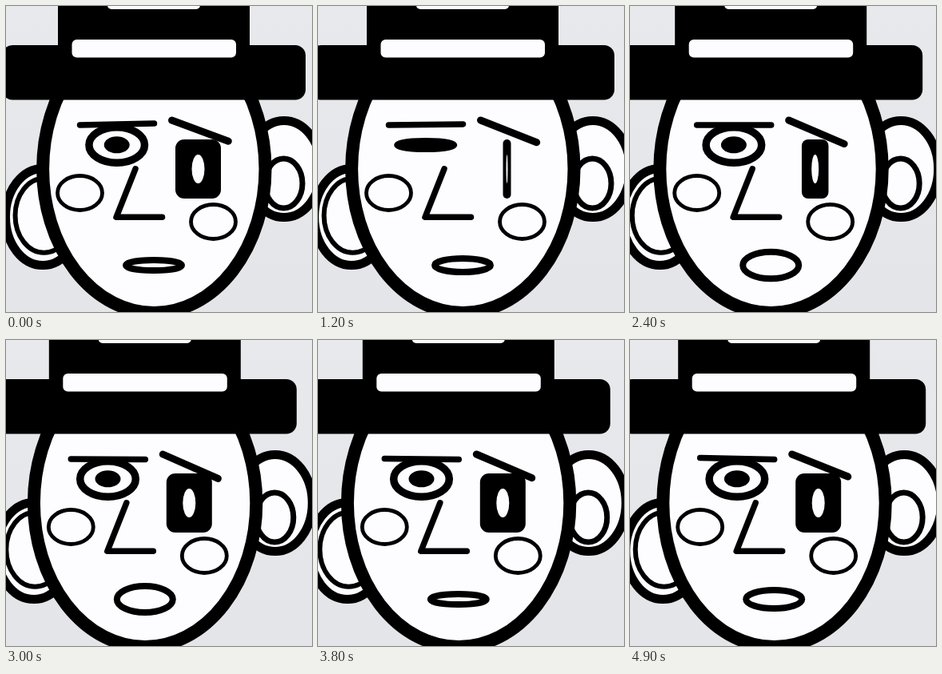
An HTML page that plays this animation: 383x383 px, repeating every 5 s.

```html
<!DOCTYPE html>
<html lang="en">
<head>
<meta charset="utf-8">
<title>Face with hat</title>
<style>
html, body { margin: 0; width: 100%; height: 100%; overflow: hidden; }
body { background: linear-gradient(#e8e9ec, #e4e5e9); }
svg { display: block; width: 100%; height: 100%; }
.line { fill: #fdfcff; stroke: #000; stroke-linecap: round; stroke-linejoin: round; }
.white { fill: #fdfcff; }
</style>
</head>
<body>
<svg viewBox="0 0 383 383">
  <g id="face">
    <g class="line">
      <ellipse cx="46" cy="264" rx="46.5" ry="60.5" stroke-width="11"/>
      <ellipse cx="47.5" cy="262.3" rx="36" ry="46.5" stroke-width="6"/>
      <ellipse cx="348" cy="204" rx="46.5" ry="60.5" stroke-width="11"/>
      <ellipse cx="347.5" cy="222" rx="23.5" ry="31" stroke-width="7"/>
      <ellipse cx="185.3" cy="204" rx="139.2" ry="180" stroke-width="16"/>
    </g>

    <rect x="65" y="-20" width="240" height="120"/>
    <rect x="-5" y="49" width="380" height="68.5" rx="13"/>
    <rect class="white" x="82.5" y="42" width="205.5" height="22.5" rx="6"/>
    <rect class="white" x="127" y="-20" width="116" height="24" rx="5"/>

    <g class="line">
      <ellipse cx="92.5" cy="234" rx="28" ry="21.5" stroke-width="4.8"/>
      <ellipse cx="259.5" cy="270" rx="28" ry="21.5" stroke-width="4.8"/>
      <path d="M162 203.8L138 264.3H195.5" fill="none" stroke-width="7.5"/>
      <ellipse id="eye" cx="138.7" cy="174" rx="34.8" stroke-width="9.5"/>
      <path id="browL" d="M92.5 148H185.5" stroke-width="7.5"/>
    </g>
    <ellipse id="pupil" cx="138.7" cy="173.8" rx="16"/>
    <rect id="block" y="167" height="74"/>
    <ellipse id="slit" class="white" cx="240.5" cy="204" ry="18"/>
    <g class="line">
      <path id="browR" d="M207.5 143h75.5" stroke-width="9"/>
      <ellipse id="mouth" cx="185" cy="324.5" rx="35" stroke-width="8"/>
    </g>
  </g>
</svg>
<script>
const LOOP = 5, STEP = 0.1;
const MOUTH = [[0, 6.5], [0.7, 10.5], [1.2, 8.5], [1.9, 17], [3, 16.5], [3.8, 6.5], [4.9, 11.5], [5, 11.5]];

const set = (id, attrs) => {
  const el = document.getElementById(id);
  for (const name in attrs) el.setAttribute(name, attrs[name]);
};
const mix = (a, b, k) => a + (b - a) * k;
const clamp = v => Math.min(1, Math.max(0, v));

function track(keys, t) {
  const i = keys.findIndex(k => k[0] > t);
  const [t0, a] = keys[i - 1], [t1, b] = keys[i];
  return mix(a, b, (t - t0) / (t1 - t0));
}

// 1 = open, 0 = shut between the two times
const lid = (t, shut, open) => 1 - clamp((t - shut) / 0.2) + clamp((t - open) / 0.2);

function draw(t) {
  // triangle wave: 4 px per second, turning at 0.15 s and 3.15 s
  const x = 4 * (Math.abs(t - 3.15) - 3) + 0.2;
  const sway = Math.min(x, 0);
  set("face", { transform: `translate(${sway})` });
  set("browL", { transform: `translate(0 ${-0.11 * sway}) rotate(${mix(-1.25, 1.25, t / LOOP)} 139 148)` });
  set("browR", { transform: `rotate(${20.3 - 0.31 * sway} 207.5 143)` });

  const left = lid(t, 0.3, 1.5), right = lid(t, 0.3, 2.3);
  set("eye", { ry: mix(4.3, 22.2, left) });
  set("pupil", { ry: mix(2, 10.5, left) });

  const w = mix(10, 57, right), r = mix(5, 11, right);
  set("block", { x: 240.5 - w / 2, width: w, rx: r, ry: r });
  set("slit", { rx: mix(1, 8, right) });
  set("mouth", { ry: track(MOUTH, t) });
}

function tick(now) {
  const steps = Math.floor(now / 1000 / STEP + 1e-6);
  draw(steps % Math.round(LOOP / STEP) * STEP);
  requestAnimationFrame(tick);
}
draw(0);
requestAnimationFrame(tick);
</script>
</body>
</html>
```
